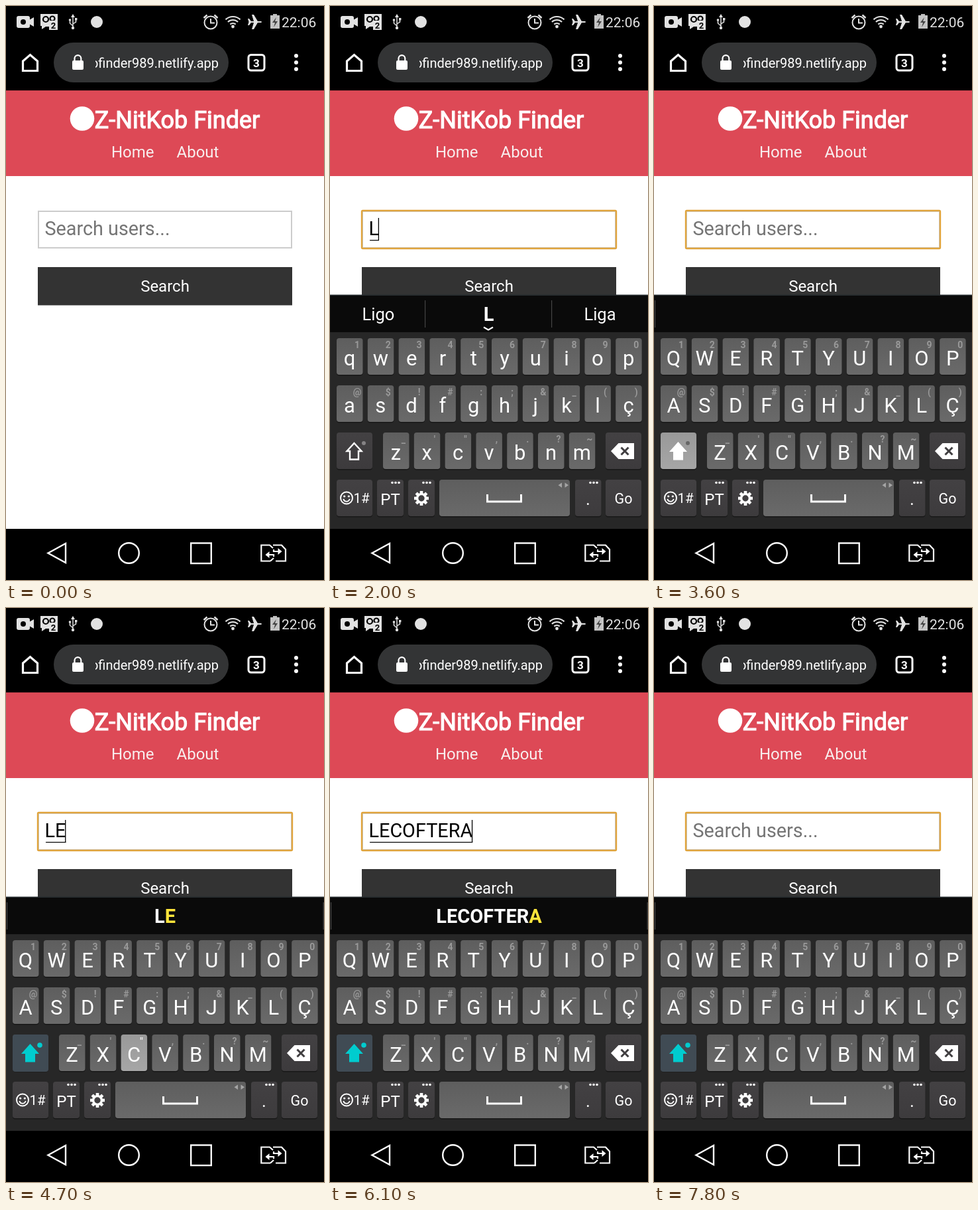
Animation, 480 px wide and 864 px high, one loop 8 s. Source, as an HTML page with a canvas:

```html
<!DOCTYPE html>
<html lang="en">
<head>
<meta charset="utf-8">
<title>Finder search</title>
<style>
html, body { margin: 0; width: 100%; height: 100%; overflow: hidden; background: #000; }
canvas { display: block; width: 480px; height: 864px; }
</style>
</head>
<body>
<canvas id="stage" width="480" height="864"></canvas>
<script>
const c = document.getElementById('stage').getContext('2d');
const LOOP = 8000, WORD = 'LECOFTERA', WHITE = '#fff', GREY = '#e2e2e2';

// [time, field content]; each entry also restarts the caret blink
const edits = [[350, ''], [1900, 'L'], [3000, ''], [4200, 'L'], [4500, WORD.slice(0, 2)]];
// [key, down, up]
const taps = [['L', 1700, 1900], ['back', 2850, 3050], ['shift', 3550, 3660],
  ['shift', 3740, 3850], ['L', 4050, 4200], [WORD[1], 4350, 4500], ['go', 6800, 7000]];
for (let i = 2; i < WORD.length; i++) {
  const at = 4800 + (i - 2) * 200;
  edits.push([at, WORD.slice(0, i + 1)]);
  taps.push([WORD[i], at - 150, at]);
}
edits.push([7000, ''], [7100, '']);

const font = (size, weight = 400) => `${weight} ${size}px Roboto, sans-serif`;

function text(s, x, y, size, color, align = 'left', weight = 400) {
  c.font = font(size, weight);
  c.fillStyle = color;
  c.textAlign = align;
  c.fillText(s, x, y);
}
function rect(x, y, w, h, color) {
  c.fillStyle = color;
  c.fillRect(x, y, w, h);
}
function round(x, y, w, h, r, color) {
  c.beginPath();
  c.roundRect(x, y, w, h, r);
  c.fillStyle = color;
  c.fill();
}
function disc(x, y, r, color) {
  c.beginPath();
  c.arc(x, y, r, 0, 7);
  c.fillStyle = color;
  c.fill();
}
function ring(x, y, r, width, color, from = 0, to = 2 * Math.PI) {
  c.beginPath();
  c.arc(x, y, r, from, to);
  c.lineWidth = width;
  c.strokeStyle = color;
  c.stroke();
}
function trace(d, color, width) {
  const p = new Path2D(d);
  if (width) {
    c.strokeStyle = color;
    c.lineWidth = width;
    c.stroke(p);
  } else {
    c.fillStyle = color;
    c.fill(p);
  }
}

function statusBar() {
  round(16, 15, 20, 18, 3, GREY);
  trace('M35 21L42 17V31L35 27Z', GREY);
  disc(26, 24, 4, '#000');
  // message badge
  trace('M52 12H78V22H66V31H60L54 35V30H52Z', GREY);
  ring(60, 20, 4, 2.2, '#000');
  ring(70, 19, 3.5, 2.2, '#000');
  rect(65, 22, 13, 14, GREY);
  text('2', 71.5, 34, 13, '#000', 'center', 700);
  // cable
  trace('M101 16V32M101 30L96.5 26V22M101 27L105.5 24V20', GREY, 1.5);
  trace('M98 17L101 12L104 17Z', GREY);
  disc(101, 33, 2.2, GREY);
  disc(96.5, 21, 1.8, GREY);
  rect(104, 18, 3.4, 3.4, GREY);
  disc(137, 24, 9, GREY);
  // alarm
  ring(309, 25, 9.5, 2, GREY);
  trace('M298.5 18L303.5 13.5M319.5 18L314.5 13.5', GREY, 2.4);
  trace('M309 19V25.5H315', GREY, 2);
  // wireless
  for (const r of [6, 11, 16]) ring(342.5, 32, r, 2.2, GREY, -2.33, -0.81);
  disc(342.5, 31, 2.4, GREY);
  trace('M365 19H367L370 23H374L371 13H374L380 23H385Q387 24 385 25H380L374 35H371L374 25H370L367 29H365L366.5 24Z', GREY);
  // battery
  rect(403, 12, 6, 3, '#bbb');
  rect(399, 14, 14, 20, '#c4c4c4');
  trace('M408 17L402 25H406L404 32L410 23H406Z', '#444');
  text('22:06', 416, 32, 21, GREY);
}

function browserBar() {
  trace('M25.5 83L36.5 73.5L47.5 83V97.5H25.5Z', WHITE, 3.2);
  round(72, 55, 264, 60, 30, '#333435');
  round(100, 82, 17, 14, 2, WHITE);
  trace('M103.5 83V79A4.8 4.8 0 0 1 113.3 79V83', WHITE, 2.2);
  c.save();
  c.beginPath();
  c.rect(135, 60, 190, 50);
  c.clip();
  text('ofinder989.netlify.app', 321, 93, 20, WHITE, 'right');
  c.restore();
  c.beginPath();
  c.roundRect(366, 73.5, 24, 23.5, 4);
  c.strokeStyle = WHITE;
  c.lineWidth = 3;
  c.stroke();
  text('3', 378, 91.5, 17, WHITE, 'center', 700);
  for (const y of [75, 85, 95]) disc(438, y, 3, WHITE);
}

function page(t, value, caretOn) {
  rect(0, 127, 480, 129, '#dd4956');
  rect(0, 127, 480, 1, '#c5424e');
  disc(115, 169.5, 18.3, WHITE);
  text('Z-NitKob Finder', 258.5, 184, 36, WHITE, 'center');
  c.strokeStyle = WHITE;
  c.lineWidth = 1.2;
  c.strokeText('Z-NitKob Finder', 258.5, 184);
  text('Home', 159, 228, 24, '#f8eeee');
  text('About', 257.5, 228, 24, '#f8eeee');

  rect(0, 256, 480, 531, WHITE);
  rect(48, 308, 384, 57, '#ccc');
  rect(50, 310, 380, 53, WHITE);
  const focus = t >= 300;
  if (focus) {
    c.beginPath();
    c.roundRect(48, 308, 384, 57, 1.5);
    c.strokeStyle = '#e0a43c';
    c.lineWidth = 2.4;
    c.stroke();
  }
  const x = 58.5;
  if (value) text(value, x, 345, 28.8, '#000');
  else text('Search users...', x, 345, 28.8, '#757575');
  const end = x + (value ? c.measureText(value).width : 0);
  if (value) rect(60, 352, end - 60, 1.2, '#000');
  if (focus && caretOn) rect(value ? end - 1.3 : 59, 319, value ? 1.3 : 1.8, 34, '#000');

  rect(48, 393, 384, 57.5, '#333');
  text('Search', 240, 430, 24, WHITE, 'center');
}

function suggestions(t, value) {
  rect(0, 435, 480, 56, '#0a0a0a');
  rect(0, 434.5, 480, 1.5, '#252b2e');
  const line = x => rect(x, 443, 1.2, 41, '#444');
  if (value.length === 1) {
    line(143);
    line(334);
    const pair = t < 3000 ? ['Ligo', 'Liga'] : ['LIGO', 'LIGA'];
    text(pair[0], 73, 473, 25.5, WHITE, 'center');
    text(pair[1], 407.5, 473, 25.5, WHITE, 'center');
    text(value, 239.5, 474, 29, WHITE, 'center', 700);
    trace('M232 483.5L239 487.5L246 483.5', WHITE, 2.2);
    return;
  }
  line(1);
  if (t < 1900 || value) line(478.6);
  if (!value) return;
  c.font = font(29, 700);
  const left = 240 - c.measureText(value).width / 2;
  const head = value.slice(0, -1);
  const split = left + c.measureText(head).width;
  text(head, left, 474, 29, WHITE, 'left', 700);
  text(value.slice(-1), split, 474, 29, '#ffe53b', 'left', 700);
}

function key(x, y, w, down, dark) {
  round(x, y + 1.5, w, 55, 4, '#181818');
  const g = c.createLinearGradient(0, y, 0, y + 55);
  const [a, b] = down ? ['#999', '#a6a6a6'] : dark ? ['#434143', '#3d3b3d'] : ['#5e5e5e', '#6a6a6a'];
  g.addColorStop(0, a);
  g.addColorStop(1, b);
  round(x, y, w, 55, 4, g);
}

function keyboard(t, value) {
  const held = k => taps.some(([name, a, b]) => name === k && t >= a && t < b);
  const caps = t >= 3800;
  const upper = caps || !value;
  rect(0, 491, 480, 296, '#272727');
  suggestions(t, value);

  const rows = [
    ['QWERTYUIOP', '1234567890', 10],
    ['ASDFGHJKLÇ', '@$!#:;&_()', 10],
    ['ZXCVBNM', '_\'",.?~', 80]
  ];
  rows.forEach(([letters, hints, x0], r) => {
    const y = 500 + 71 * r;
    [...letters].forEach((ch, i) => {
      const x = x0 + 46.8 * i, down = held(ch);
      key(x, y, 39.5, down);
      text(hints[i], x + 31, y + 15, 14, down ? '#eee' : '#999', 'center', 700);
      text(upper ? ch : ch.toLowerCase(), x + 19.5, y + 41, 31, WHITE, 'center');
    });
  });

  // shift
  const shiftDown = held('shift');
  key(10, 642, 54, shiftDown, true);
  if (caps) round(10, 642, 54, 56, 4, '#404b54');
  const arrow = 'M36.5 656L50 671H44V683.5H29V671H23Z';
  if (upper) trace(arrow, caps ? '#00cccf' : WHITE);
  else trace('M36.5 658L47.5 670H43V682.5H30V670H25.5Z', WHITE, 2.4);
  disc(51, 658, caps ? 3.8 : 3, caps ? '#00cccf' : shiftDown ? '#666' : '#858385');

  // delete
  key(416, 642, 54, held('back'), true);
  trace('M424 670L435.5 658H459V682H435.5Z', WHITE);
  trace('M439.5 664.5L450.5 675.5M450.5 664.5L439.5 675.5', '#403e40', 3);

  bottomRow(held('go'));
}

function bottomRow(goDown) {
  const y = 713;
  key(10, y, 54, false, true);
  ring(25, 740.5, 9, 2, WHITE);
  disc(21.7, 738, 1.6, WHITE);
  disc(28.3, 738, 1.6, WHITE);
  ring(25, 741, 4.8, 1.8, WHITE, 0.2, 2.94);
  text('1#', 35.5, 748, 20.5, WHITE);

  key(71, y, 40, false, true);
  text('PT', 91, 751, 24, WHITE, 'center');

  key(118, y, 40, false, true);
  ring(138, 741, 6.4, 3.4, WHITE);
  for (let i = 0; i < 8; i++) {
    c.save();
    c.translate(138, 741);
    c.rotate(i * Math.PI / 4);
    rect(-2.3, -11, 4.6, 4.5, WHITE);
    c.restore();
  }

  key(165, y, 197);
  trace('M237.5 735V746H288.5V735', WHITE, 3);
  trace('M350 717.5V725L344.5 721.2ZM354.5 717.5V725L360 721.2Z', '#a5a5a5');

  key(370, y, 39.5, false, true);
  text('.', 389.5, 751, 26, WHITE, 'center');
  key(416, y, 54, goDown, true);
  text('Go', 443, 749, 21.5, WHITE, 'center');
  for (const x of [99, 146, 398]) {
    for (const d of [-5, 0, 5]) disc(x + d, 717.5, 1.8, WHITE);
  }
}

function navBar() {
  rect(0, 787, 480, 77, '#000');
  trace('M63.5 823.5L90 809V838Z', WHITE, 2.4);
  ring(185.5, 823.5, 15.3, 2.4, WHITE);
  c.strokeRect(279.2, 808.5, 30.6, 30.5);
  trace('M399 835.5H385.3V811.5H398L403 816M409 811.5H416L422 818V835.5H407M403 811.5H409M399 835.5L404 831', WHITE, 2.2);
  trace('M393 826H404V829M415 821H404V818', WHITE, 2.2);
  trace('M397.5 821L391.5 826L397.5 831ZM410.5 816L416.5 821L410.5 826Z', WHITE);
}

function draw(t) {
  let edit = [0, ''];
  for (const e of edits) if (t >= e[0]) edit = e;
  const [since, value] = edit;
  rect(0, 0, 480, 864, '#000');
  statusBar();
  browserBar();
  page(t, value, Math.floor((t - since) / 500) % 2 === 0);
  if (t >= 800) keyboard(t, value);
  navBar();
}

const start = performance.now();
function tick() {
  draw((performance.now() - start) % LOOP);
  requestAnimationFrame(tick);
}
tick();
</script>
</body>
</html>
```
